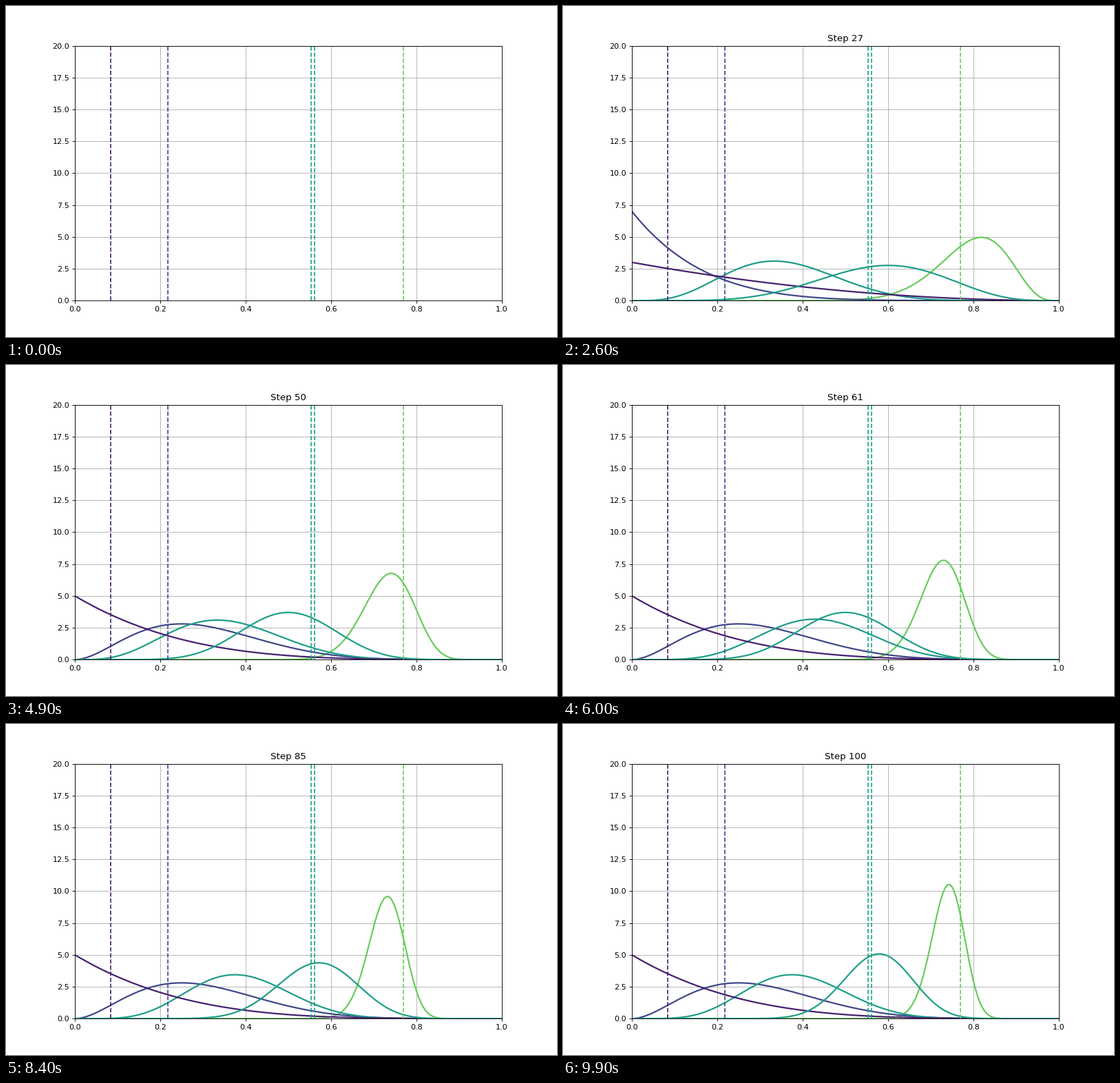
Animation, 800 px wide and 480 px high, one loop 10 s. Source, as a matplotlib script:

```python
import math

import numpy as np
import matplotlib.pyplot as plt
from matplotlib.animation import FuncAnimation

STEPS = 100
WEIGHT = 2  # each result is counted twice
RATES = [0.7694, 0.2177, 0.5532, 0.0839, 0.5613]

# Key points (round, pulls) for every arm but the leader
PULLS = {
    1: [(0, 0), (9, 3), (38, 4)],
    2: [(0, 0.5), (24, 6), (82, 8)],
    3: [(0, 0), (4, 1), (36, 2)],
    4: [(0, 0), (48, 10), (70, 11), (99, 19)],
}
# Key points (pulls, wins) for every arm
WINS = [
    [(0, 0), (11, 9), (66, 49)],
    [(0, 0), (4, 1)],
    [(0, 0.4), (8, 3.4)],
    [(0, 0)],
    [(0, 0), (2, 2), (11, 6.2), (19, 11.2)],
]


def count(n, keys):
    return int(np.interp(n, *zip(*keys)))


def play():
    """Pull a rival that is behind its schedule, otherwise the leader."""
    pulls = [0] * len(RATES)
    history = [pulls]
    for n in range(1, STEPS):
        due = (k for k, keys in PULLS.items() if pulls[k] < count(n, keys))
        arm = next(due, 0)
        pulls = [p + (k == arm) for k, p in enumerate(pulls)]
        history.append(pulls)
    return history


def beta_pdf(x, a, b):
    scale = math.exp(math.lgamma(a + b) - math.lgamma(a) - math.lgamma(b))
    return scale * x ** (a - 1) * (1 - x) ** (b - 1)


history = play()
x = np.linspace(0, 1, 200)

fig, ax = plt.subplots(figsize=(10, 6), dpi=80)
ax.set_xlim(0, 1)
ax.set_ylim(0, 20)
ax.grid(True)
title = ax.set_title("")

colors = [plt.cm.viridis(rate) for rate in RATES]
curves = [ax.plot([], [], color=c, lw=2)[0] for c in colors]
for rate, c in zip(RATES, colors):
    ax.axvline(rate, color=c, linestyle="--")


def draw(i):
    title.set_text(f"Step {i + 1}" if i else "")
    for curve, pulls, keys in zip(curves, history[i], WINS):
        wins = count(pulls, keys)
        a, b = 1 + WEIGHT * wins, 1 + WEIGHT * (pulls - wins)
        curve.set_data(x, beta_pdf(x, a, b))
        curve.set_visible(i > 0)
    return [*curves, title]


anim = FuncAnimation(fig, draw, frames=STEPS, init_func=lambda: draw(0),
                     interval=100, repeat=True, repeat_delay=0, blit=False)
plt.show()
```
